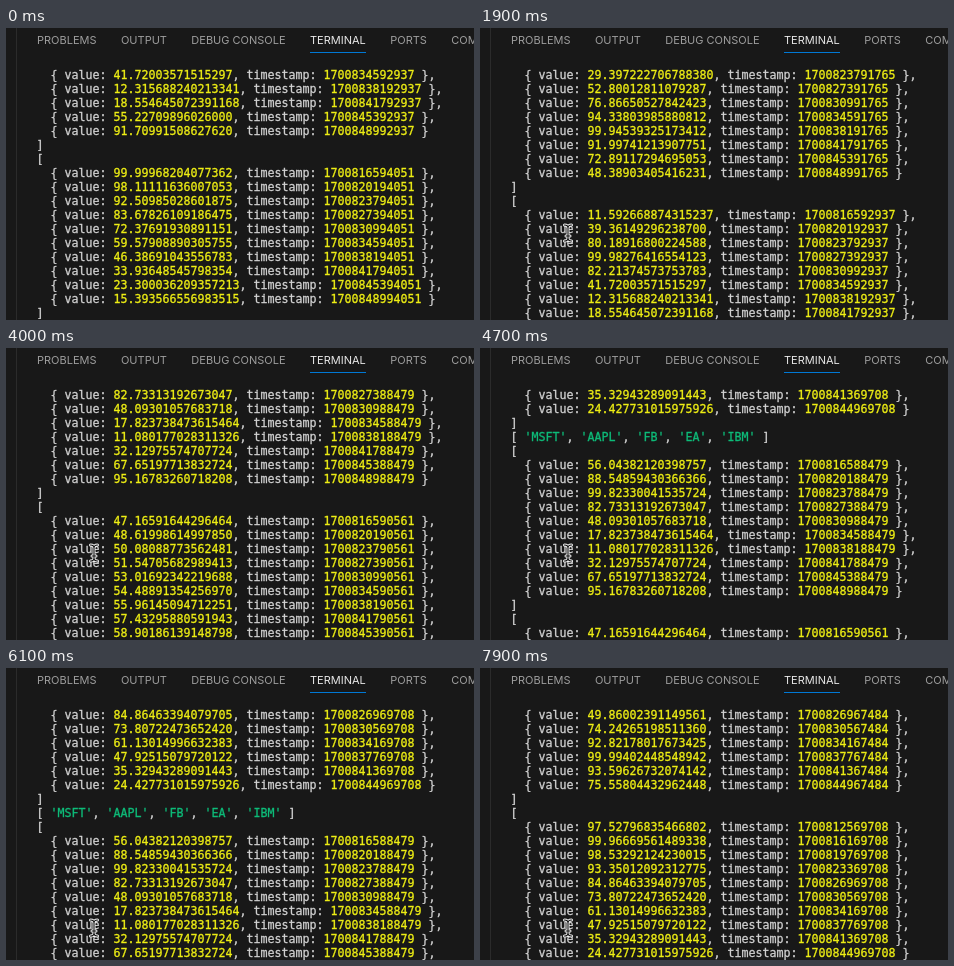
Recreate the animation shown at these times as an HTML page with a canvas. Size 468 px wide and 292 px high, loop 8000 ms.

```html
<!DOCTYPE html>
<html lang="en">
<head>
<meta charset="utf-8">
<title>Terminal scrollback</title>
<style>
  html, body { margin: 0; width: 100%; height: 100%; overflow: hidden; background: #181818; }
  canvas { display: block; width: 468px; height: 292px; }
</style>
</head>
<body>
<canvas id="stage"></canvas>
<script>
const W = 468, H = 292, LOOP = 8000, TICK = 100;
const FONT_SIZE = 11.63, LINE = 14, LEFT = 30.5, FIRST_BASELINE = 51, ROWS = 18;
const HOUR = 3600000, PERIOD = 8 * 24 * HOUR, SAMPLES = 10;
const COLORS = { bg: '#181818', text: '#d2d2d2', number: '#eeee14', string: '#0dbc79' };

const canvas = document.getElementById('stage');
const ctx = canvas.getContext('2d');
const ratio = window.devicePixelRatio || 1;
canvas.width = W * ratio;
canvas.height = H * ratio;
ctx.scale(ratio, ratio);

// Each series samples a sine wave every hour; cycles counts waves per eight days.
const series = [
  { start: 1700812567484, cycles: 17, phase: 0.3 },
  { start: 1700812569708, cycles: 9, phase: 0.2, symbols: ['MSFT', 'AAPL', 'FB', 'EA', 'IBM'] },
  { start: 1700816588479, cycles: 25, phase: 0.2 },
  { start: 1700816590561, cycles: 1, phase: 0.3 },
  { start: 1700816591765, cycles: 17, phase: 0.3 },
  { start: 1700816592937, cycles: 29, phase: 0.3 },
  { start: 1700816594051, cycles: 9, phase: 0.2 }
];

// A line is a list of [text, color] spans.
const plain = text => [text, COLORS.text];
const number = text => [String(text), COLORS.number];

function sample(time, cycles, phase) {
  const turns = cycles * (time % PERIOD) / PERIOD + phase;
  const value = 55 + 45 * Math.sin(2 * Math.PI * turns);
  return value.toFixed(value < 32 ? 15 : 14);
}

function seriesLines({ start, cycles, phase, symbols }) {
  const lines = [[plain('[')]];
  for (let i = 0; i < SAMPLES; i++) {
    const time = start + i * HOUR;
    lines.push([
      plain('  { value: '), number(sample(time, cycles, phase)),
      plain(', timestamp: '), number(time),
      plain(i < SAMPLES - 1 ? ' },' : ' }')
    ]);
  }
  lines.push([plain(']')]);
  if (symbols) {
    const spans = symbols.flatMap((name, i) => [plain(i ? ', ' : '[ '), [`'${name}'`, COLORS.string]]);
    lines.push([...spans, plain(' ]')]);
  }
  return lines;
}

const lines = series.flatMap(seriesLines).slice(5);

const progress = (t, from, to) => Math.min(1, Math.max(0, (t - from) / (to - from)));
const mix = (a, b, u) => a + (b - a) * u;

// Upward scroll gestures, in lines.
const swipes = [
  { from: 1200, to: 1900, by: 15 },
  { from: 2300, to: 3100, by: 15 },
  { from: 3300, to: 4700, by: 16 },
  { from: 5600, to: 7400, by: 16 }
];

function topLine(t) {
  const scrolled = swipes.reduce((sum, s) => sum + s.by * progress(t, s.from, s.to), 0);
  return Math.round(lines.length - ROWS - scrolled);
}

function pointerAt(t) {
  const enter = progress(t, 500, 1100), drop = progress(t, 5200, 5600);
  return [mix(21, 88, enter), mix(305, 205, enter) + 55 * drop];
}

function drawTabs() {
  ctx.font = '11px Inter, Roboto, sans-serif';
  let x = 31;
  for (const label of ['PROBLEMS', 'OUTPUT', 'DEBUG CONSOLE', 'TERMINAL', 'PORTS', 'COMMENTS']) {
    const active = label === 'TERMINAL';
    const width = ctx.measureText(label).width;
    ctx.fillStyle = active ? '#e7e7e7' : '#9d9d9d';
    ctx.fillText(label, x, 16);
    if (active) {
      ctx.fillStyle = '#0078d4';
      ctx.fillRect(Math.round(x), 24, Math.round(width), 1);
    }
    x += width + 24.4;
  }
}

function drawLine(spans, baseline) {
  let x = LEFT;
  for (const [text, color] of spans) {
    ctx.fillStyle = ctx.strokeStyle = color;
    ctx.fillText(text, x, baseline);
    ctx.strokeText(text, x, baseline);
    x += ctx.measureText(text).width;
  }
}

function drawPointer([x, y]) {
  ctx.save();
  ctx.translate(x, y);
  ctx.beginPath();
  for (const s of [-1, 1]) {
    ctx.moveTo(-3.5, s * 8);
    ctx.quadraticCurveTo(0, s * 8, 0, s * 5);
    ctx.quadraticCurveTo(0, s * 8, 3.5, s * 8);
  }
  ctx.moveTo(0, -6);
  ctx.lineTo(0, 6);
  ctx.moveTo(-2, 3);
  ctx.lineTo(2, 3);
  ctx.lineCap = 'round';
  for (const [color, width] of [['#f2f2f2', 3], ['#111', 1.1]]) {
    ctx.strokeStyle = color;
    ctx.lineWidth = width;
    ctx.stroke();
  }
  ctx.restore();
}

function draw(t) {
  ctx.fillStyle = COLORS.bg;
  ctx.fillRect(0, 0, W, H);
  ctx.fillStyle = '#2b2b2b';
  ctx.fillRect(10, 0, 1, H);
  drawTabs();

  // A hairline stroke gives the terminal text its heavier weight.
  ctx.font = `${FONT_SIZE}px "DejaVu Sans Mono", monospace`;
  ctx.lineWidth = 0.3;
  const top = topLine(t);
  for (let row = 0; row < ROWS; row++) {
    drawLine(lines[top + row], FIRST_BASELINE + row * LINE);
  }
  drawPointer(pointerAt(t));
}

function frame(now) {
  const t = now % LOOP;
  draw(t - t % TICK);
  requestAnimationFrame(frame);
}
requestAnimationFrame(frame);
</script>
</body>
</html>
```
